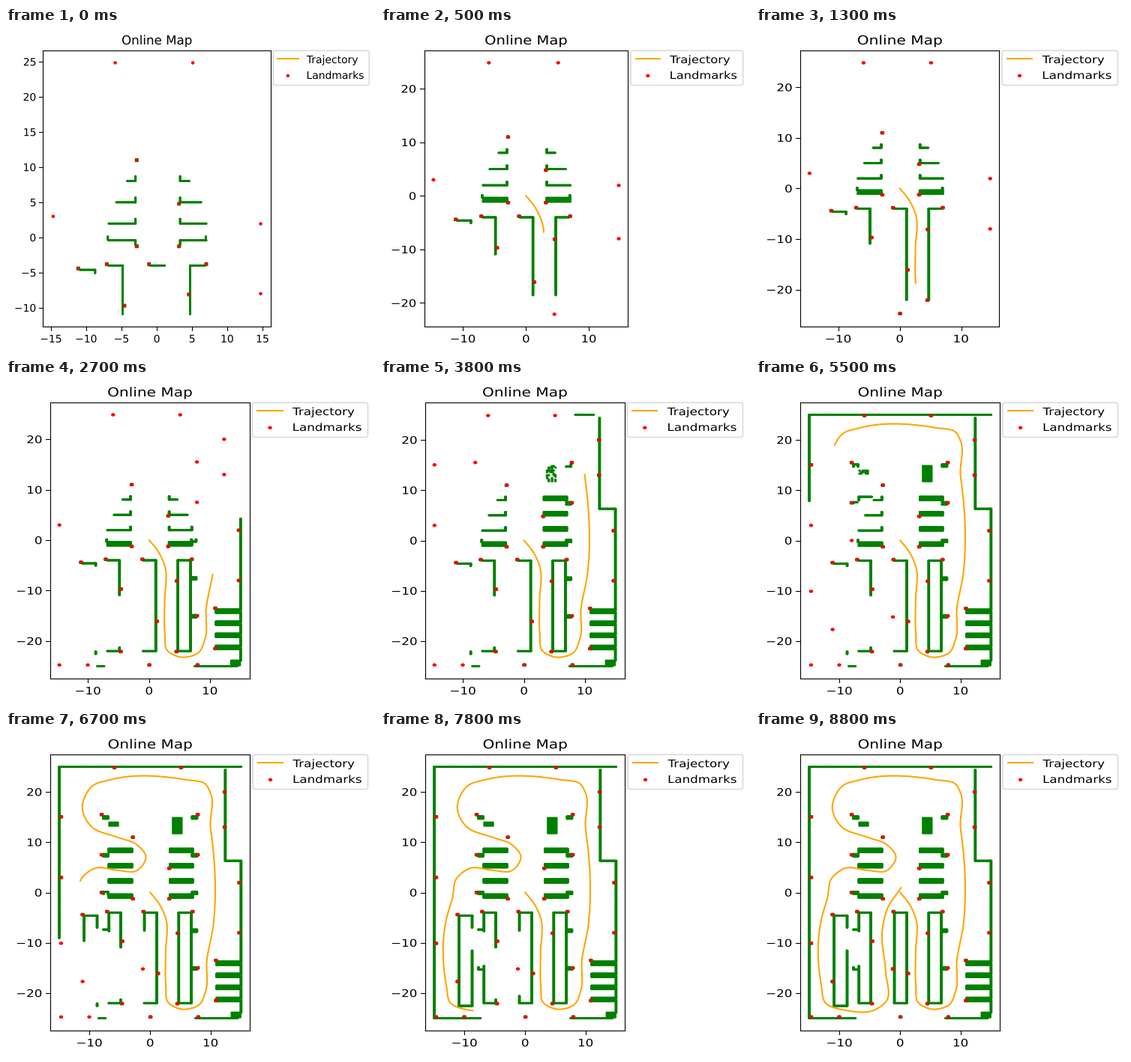
These frames come from a looping animation (492x433 px, 8900 ms). A matplotlib script:

```python
import numpy as np
import matplotlib.pyplot as plt
from matplotlib.animation import FuncAnimation
from matplotlib.collections import LineCollection, PathCollection
from matplotlib.lines import Line2D
from matplotlib.patches import FancyBboxPatch, PathPatch
from matplotlib.path import Path
from matplotlib.textpath import TextPath
from matplotlib.transforms import Affine2D

W, H, DPI = 492, 433, 100
FRAMES, STEP_MS = 89, 100
LEFT, TOP, BOTTOM = 49.0, 29.7, 399.3   # plot box before widening
MARGINS = 187.5                         # width of everything beside the plot box
PT = DPI / 72
REACH, FAR = 12, 40                     # scanner range for walls and landmarks
rng = np.random.default_rng(4)

# ---- route: key points of each leg, keyed by the frame that ends it ----
legs = {
    13: [(0, 0), (1.3, -1.9), (2.55, -5), (2.55, -12), (2.6, -18.7)],
    27: [(3, -21.9), (5.2, -23.2), (8, -22.4), (9.2, -19.4), (9.35, -13.6),
         (10.4, -6.8)],
    38: [(10.75, 1), (10.4, 8.5), (9.95, 13.1)],
    55: [(9.9, 20), (9.1, 21.6), (6, 22.4), (-6.5, 22.45), (-9.4, 21.3),
         (-10.8, 19)],
    78: [(-11.2, 17), (-9.6, 13), (-5.3, 10.95), (-2.3, 9.6), (-.7, 7.1),
         (-2.4, 4.25), (-5.3, 4.4), (-9, 4.85), (-11.2, 3), (-12, -1.1),
         (-12.95, -5), (-13, -18.5), (-12.3, -22), (-8.65, -23.5)],
    88: [(-4.5, -23.5), (-2.4, -21.8), (-2.4, -15.7), (-2.95, -7.5),
         (-2.1, -3.2), (.15, .95)],
}
keys = np.array([p for leg in legs.values() for p in leg])
s_key = np.r_[0, np.cumsum(np.hypot(*np.diff(keys, axis=0).T))]
slope = np.gradient(keys, s_key, axis=0)


def smooth(s):
    """Cubic Hermite curve through the key points at chord length s."""
    i = np.clip(np.searchsorted(s_key, s, "right") - 1, 0, len(keys) - 2)
    h = (s_key[i + 1] - s_key[i])[:, None]
    u = (s - s_key[i])[:, None] / h
    return ((1 + 2 * u) * (1 - u) ** 2 * keys[i] + u * (1 - u) ** 2 * h * slope[i]
            + u * u * (3 - 2 * u) * keys[i + 1] - u * u * (1 - u) * h * slope[i + 1])


leg_end = np.cumsum([len(leg) for leg in legs.values()]) - 1


def driven(t):
    s = np.interp(t, [0, *legs], np.r_[0, s_key[leg_end]])
    return smooth(np.linspace(0, s, int(s * 4) + 2))


# ---- map: line segments (x0, y0, x1, y1) that block the view ----
segments, shelves = [], []


def chain(*pts):
    segments.extend(a + b for a, b in zip(pts, pts[1:]))


def box(x0, x1, y0, y1):
    chain((x0, y0), (x1, y0), (x1, y1), (x0, y1), (x0, y0))


def shelf(x0, x1, y0, h=.65):
    box(x0, x1, y0, y0 + h)
    shelves.append((x0, x1, y0, y0 + h))


chain((-7.4, -25), (-15, -25), (-15, 25), (15, 25))
chain((12.4, 24.4), (12.4, 6.3), (15, 6.3), (15, -25), (7.5, -25))
for x0, x1 in ((-6.8, -4.85), (-.95, 1.1), (4.72, 6.8)):
    box(x0, x1, -22, -4)
box(-10.9, -8.75, -22.55, -4.6)
for y in -1.05 + 3.03 * np.arange(4):
    shelf(-6.8, -3.03, y)
    shelf(3.3, 7, y)
for y in -21.6 + 2.4 * np.arange(4):
    shelf(11, 15, y)
for y in 7.5 * np.arange(-2, 3):
    box(-7.7, -6.95, y - .3, y + .12)
    box(6.95, 7.7, y - .3, y + .12)
walls = np.array(segments, float)
heaps = [(3.8, 5.2, 11.8, 15), (-6.7, -5.4, 13.3, 14.1), (13.5, 14.9, -24.8, -23.9)]
for heap in heaps:
    box(*heap)
blockers = np.array(segments, float)

# landmarks in rows and columns
spots = [([-5.9, 5.1], 24.85), (-14.7, [15.05, 3, -10.1]), (14.72, [1.95, -8]),
         ([-14.7, -10.05, .05, 7.95], -24.75), ([-7.1, -1.1, 7], -3.8),
         ([-2.85, 3.15], -1.25), (-8, [15.5, 7.5, 0]), (7.85, [15.5, 7.5, -15]),
         (12.3, [20, 13]), (10.85, [-13.5, -21.5]), ([-4.65, 4.5], -22.1),
         (-11.15, [-4.4, -17.7]), (-2.85, 11), (3.15, 4.8), (4.55, -8.1),
         (-4.6, -9.7), (1.3, -16.1), (-1.2, -15.2)]
marks = np.vstack([np.column_stack(np.broadcast_arrays(*map(np.atleast_1d, s)))
                   for s in spots])

# ---- scanner: first frame in which each point is in range and in sight ----
robot = np.array([driven(t)[-1] for t in range(FRAMES)])


def cross(a, b):
    return a[..., 0] * b[..., 1] - a[..., 1] * b[..., 0]


def in_sight(eye, pts):
    ray = (pts - eye)[:, None]
    start, along = blockers[:, :2] - eye, blockers[:, 2:] - blockers[:, :2]
    with np.errstate(divide="ignore", invalid="ignore"):
        den = cross(ray, along)
        u, v = cross(start, along) / den, cross(start, ray) / den
    near = 1 - .05 / np.hypot(ray[..., 0], ray[..., 1])
    return ~((u > 0) & (u < near) & (v >= 0) & (v <= 1)).any(1)


def first_seen(pts, reach, opaque=True):
    born = np.full(len(pts), np.inf)
    for t, eye in enumerate(robot):
        i = np.flatnonzero(np.isinf(born) & (np.hypot(*(pts - eye).T) < reach))
        if opaque and len(i):
            i = i[in_sight(eye, pts[i])]
        born[i] = t
    return born


def sample(x0, y0, x1, y1, step=.12):
    n = int(np.hypot(x1 - x0, y1 - y0) / step) + 2
    return np.linspace((x0, y0), (x1, y1), n)


cloud = []
pts = np.vstack([sample(*w) for w in walls])
cloud.append((pts, first_seen(pts, REACH)))
for x0, x1, y0, y1 in shelves:          # cores fill in once both sides are known
    low, high = sample(x0, y0, x1, y0, .4), sample(x0, y1, x1, y1, .4)
    cloud.append(((low + high) / 2,
                  np.maximum(first_seen(low, REACH), first_seen(high, REACH))))
for x0, x1, y0, y1 in heaps:
    pts = np.stack(np.meshgrid(np.arange(x0, x1 + .1, .27),
                               np.arange(y0, y1 + .1, .3)), -1).reshape(-1, 2)
    cloud.append((pts, first_seen(pts, REACH, False) + rng.uniform(0, 10, len(pts))))
near_born = first_seen(marks, REACH)
for dx in (-.12, .12):                  # scanned posts behind the landmarks
    for dy in (-.12, .12):
        cloud.append((marks + (dx, dy), near_born))
cloud_xy = np.vstack([c[0] for c in cloud])
cloud_born = np.concatenate([c[1] for c in cloud])
marks_born = first_seen(marks, FAR)

# ---- figure: one full-size axes in pixels, y down ----
fig = plt.figure(figsize=(W / DPI, H / DPI), dpi=DPI, facecolor="white")
ax = fig.add_axes([0, 0, 1, 1])
ax.set_xlim(0, W)
ax.set_ylim(H, 0)
ax.axis("off")

widen, scale = Affine2D(), Affine2D()
page = widen + ax.transData
world = scale + page


def dots(color, place, z):
    c = PathCollection([Path.unit_circle()], facecolor=color, edgecolor="none",
                       offsets=np.zeros((1, 2)), offset_transform=place, zorder=z)
    ax.add_collection(c, autolim=False)
    return c


def line(place, z):
    return ax.add_artist(Line2D([], [], color="orange", lw=1.5, transform=place,
                                zorder=z, solid_capstyle="projecting"))


green = dots("green", world, 2)
red = dots("red", world, 4)
key_dot = dots("red", page, 7)
track, key_line = line(world, 3), line(page, 7)
rules = LineCollection([], colors="black", linewidths=.8, capstyle="projecting",
                       transform=page, zorder=5)
ax.add_collection(rules, autolim=False)
key_box = FancyBboxPatch((0, 33), 122, 40.6, boxstyle="round,pad=2.8,rounding_size=2.8",
                         fc="white", ec="0.8", lw=1, alpha=.8, transform=page, zorder=6)
ax.add_artist(key_box)
letters = PathPatch(Path([(0, 0)]), fc="black", lw=0, transform=page, zorder=8)
ax.add_artist(letters)

glyphs = {}


def text(s, x, y, anchor=0, size=10):
    """Outline of s with its baseline at y; anchor 0 left, .5 centre, 1 right."""
    if (s, size) not in glyphs:
        glyphs[s, size] = TextPath((0, 0), s, size=size * PT,
                                   prop={"family": "DejaVu Sans"})
    g = glyphs[s, size]
    ink = g.get_extents()
    x -= ink.x0 + anchor * ink.width
    return Affine2D().scale(1, -1).translate(x, y).transform_path(g)


def ticks(lo, hi, step):
    return np.arange(np.ceil(lo / step), np.floor(hi / step) + 1) * step


def label(v):
    return f"{v:.0f}".replace("-", "\u2212")


def update(t):
    g, m, p = cloud_xy[cloud_born <= t], marks[marks_born <= t], driven(t)
    data = np.vstack([g, m, p])
    lo, hi = data.min(0), data.max(0)
    pad = .05 * (hi - lo)
    lo, hi = lo - pad, hi + pad

    # equal units, then the whole page widens to fill the stage
    k = (BOTTOM - TOP) / (hi[1] - lo[1])
    right = LEFT + k * (hi[0] - lo[0])
    s = W / (MARGINS + right - LEFT)
    widen.clear().scale(s, 1)
    scale.clear().scale(k, -k).translate(LEFT - k * lo[0], BOTTOM + k * lo[1])

    for c, xy, d in ((green, g, 3.1), (red, m, 4.5),
                     (key_dot, [(right + 22.5, 63.8)], 4.5)):
        c.set_offsets(xy)
        c.set_transform(Affine2D().scale(d * s / 2, d / 2))
    track.set_data(p.T if t else ([], []))
    key_line.set_data([right + 8.8, right + 36.2], [41, 41])
    key_box.set_x(right + 5.8)

    segs = [[(LEFT, TOP), (right, TOP)], [(LEFT, BOTTOM), (right, BOTTOM)],
            [(LEFT, TOP), (LEFT, BOTTOM)], [(right, TOP), (right, BOTTOM)]]
    words = [text("Online Map", (LEFT + right) / 2, 22, .5, 12),
             text("Trajectory", right + 47.4, 47),
             text("Landmarks", right + 48.4, 68)]
    for v in ticks(lo[0], hi[0], 5 if right - LEFT > 291 else 10):
        x = LEFT + k * (v - lo[0])
        segs.append([(x, BOTTOM), (x, BOTTOM + 4.9)])
        words.append(text(label(v), x, 420.2, .5))
    for v in ticks(lo[1], hi[1], 5 if hi[1] - lo[1] < 45 else 10):
        y = BOTTOM - k * (v - lo[1])
        segs.append([(LEFT, y), (LEFT - 4.9, y)])
        words.append(text(label(v), 39.3, y + 5.2, 1))
    rules.set_segments(segs)
    letters.set_path(Path.make_compound_path(*words))


anim = FuncAnimation(fig, update, frames=FRAMES, interval=STEP_MS, init_func=lambda: None,
                     repeat=True, repeat_delay=0, blit=False)
plt.show()
```
